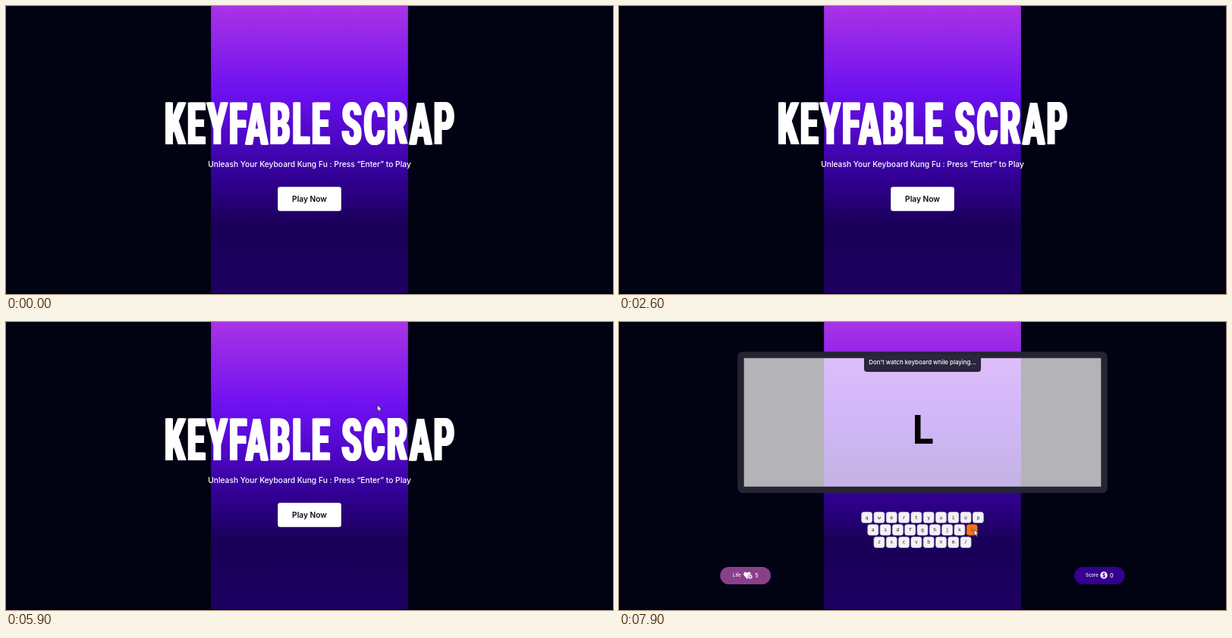
Write an HTML page that moves like this. It is 800 by 381 pixels and loops after 8 s.

```html
<!DOCTYPE html>
<html lang="en">
<head>
<meta charset="utf-8">
<title>Typing game</title>
<style>
  html, body { margin: 0; width: 100%; height: 100%; overflow: hidden; background: #010313; }
  svg { display: block; width: 100vw; height: 100vh; }
  text { font-family: Inter, "Open Sans", sans-serif; font-weight: 550; fill: #fff; }
  .mid { text-anchor: middle; }
  .title text { font: 900 77px Roboto, "Liberation Sans", sans-serif; letter-spacing: 5px; }
  .lead { font-size: 10.25px; }
  .play { font-size: 10.2px; font-weight: 600; fill: #0b0713; }
  .hint { font-size: 7.9px; }
  .letter { font: 700 52px "DejaVu Sans Mono", monospace; fill: #000; }
  .key rect { fill: #f4f2f6; stroke: #d5d1de; stroke-width: .8; }
  .key text { font: 6.5px "DejaVu Sans Mono", monospace; fill: #292631; }
  .key.on rect { fill: #f97316; stroke: #e0650f; }
  .key.on text { fill: #7a3208; }
  .label { font-size: 6px; }
  .count { font-size: 7.2px; }
  .coin { font-size: 7px; font-weight: 700; fill: #34008f; }

  .home, .game, .show, .cursor { animation: 8s infinite; }
  .home { animation-name: home; animation-timing-function: step-end; }
  .game { animation-name: game; animation-timing-function: step-end; }
  .show { animation-name: show; animation-timing-function: step-end; }
  .cursor { animation-name: move; animation-timing-function: linear; }

  @keyframes home { 0% { opacity: 1; } 87.45%, 100% { opacity: 0; } }
  @keyframes game { 0% { opacity: 0; } 87.45%, 100% { opacity: 1; } }
  @keyframes show { 0% { opacity: 0; } 71.2%, 100% { opacity: 1; } }
  @keyframes move {
    0%, 71.2% { transform: translate(542px, 18px); animation-timing-function: ease-out; }
    81.25%, 90% { transform: translate(405.5px, 256.5px); animation-timing-function: ease-in-out; }
    93.75%, 95% { transform: translate(410px, 269px); }
    96.25% { transform: translate(424px, 285px); }
    97.5% { transform: translate(452px, 284px); }
    98.7%, 100% { transform: translate(468px, 274.5px); }
  }
</style>
</head>
<body>
<svg viewBox="0 0 800 381">
  <defs>
    <linearGradient id="glow" x2="0" y2="1">
      <stop offset="0" stop-color="#aa33e5"/>
      <stop offset=".3" stop-color="#6c10f0"/>
      <stop offset=".43" stop-color="#5309cd"/>
      <stop offset=".6" stop-color="#310092"/>
      <stop offset=".76" stop-color="#1a0058"/>
      <stop offset="1" stop-color="#1d0061"/>
    </linearGradient>
  </defs>

  <rect width="800" height="381" fill="#010313"/>
  <rect x="270.2" width="259.6" height="381" fill="url(#glow)"/>
  <rect y="380" width="800" height="1"/>

  <g class="home">
    <!-- condensed heavy face: squeezed black weight with thickened stems -->
    <g class="title mid" transform="translate(401.4 183) scale(.547 1)">
      <text id="name">KEYFABLE SCRAP</text>
      <use href="#name" x="-2.5"/>
      <use href="#name" x="2.5"/>
    </g>
    <text class="lead mid" x="400" y="213">Unleash Your Keyboard Kung Fu : Press “Enter” to Play</text>
    <rect x="358.2" y="239.3" width="83.6" height="32" rx="3" fill="#fff"/>
    <text class="play mid" x="400" y="259">Play Now</text>
  </g>

  <g class="game">
    <rect x="160.5" y="43.5" width="479" height="178.5" rx="2.5" fill="#fff" fill-opacity=".7"/>
    <rect x="160.5" y="43.5" width="479" height="178.5" rx="2.5" fill="none" stroke="#252433" stroke-width="8.4"/>
    <path d="M323 43V62a4 4 0 0 0 4 4H473a4 4 0 0 0 4-4V43Z" fill="#2b253d"/>
    <text class="hint mid" x="400" y="56">Don't watch keyboard while playing...</text>
    <text class="letter mid" x="400" y="160.5">L</text>

    <g id="keys"></g>

    <rect x="133.3" y="324" width="66.7" height="23" rx="11.5" fill="#8a3f8b"/>
    <text class="label" x="150" y="337">Life</text>
    <path d="M169 340 165 335.6C162.5 332.6 166.5 328.8 169 332.2 171.5 328.8 175.5 332.6 173 335.6Z" fill="#fff"/>
    <circle cx="173" cy="337" r="3" fill="#fff" stroke="#8a3f8b" stroke-width=".6"/>
    <path d="M171.4 337h3.2M173 335.4v3.2" stroke="#8a3f8b" stroke-width=".9"/>
    <text class="count" x="179.2" y="338.2">5</text>

    <rect x="600" y="324" width="66.7" height="23" rx="11.5" fill="#34008f"/>
    <text class="label" x="615" y="337">Score</text>
    <circle cx="639" cy="335" r="4.7" fill="#fff"/>
    <text class="coin mid" x="639" y="337.5">$</text>
    <text class="count" x="647" y="338.2">0</text>
  </g>

  <g class="show">
    <path class="cursor" d="M0 0V8L1.9 6.4 3.2 9.2 4.5 8.6 3.3 5.9H5.7Z"
          fill="#fff" stroke="#1c1826" stroke-width=".7" stroke-linejoin="round"/>
  </g>
</svg>
<script>
  const pitch = 16.3;
  const rows = ["qwertyuiop", "asdfghjkl", "zxcvbnm/"];
  document.getElementById("keys").innerHTML = rows.map((row, r) =>
    [...row].map((char, i) => {
      const x = 400 + (i - (row.length - 1) / 2) * pitch;
      const y = 258.6 + r * 16.4;
      return `<g class="key mid${char === "l" ? " on" : ""}" transform="translate(${x} ${y})">
        <rect x="-6.9" y="-7" width="13.8" height="14" rx="2.8"/>
        <text y="1.9">${char}</text></g>`;
    }).join("")
  ).join("");
</script>
</body>
</html>
```
